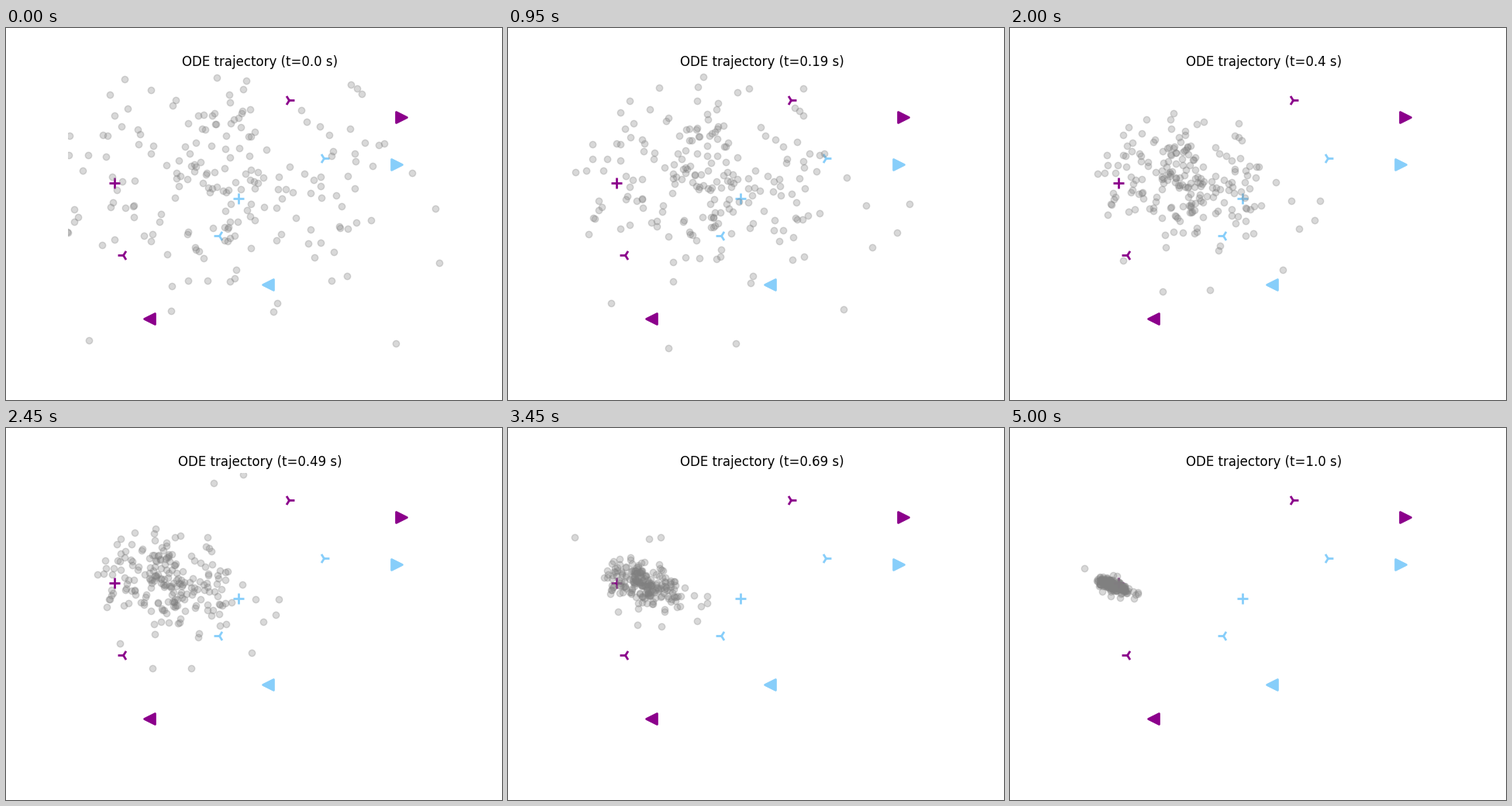
A matplotlib script that plays this animation: 640 by 480 pixels, repeating every 5.55 s.

```python
import numpy as np
import matplotlib.pyplot as plt
from matplotlib.animation import FuncAnimation

STEPS, HOLD, INTERVAL = 100, 11, 50
START = np.array([300, 220])

# Outermost particles, which shape the rim of the cloud (stage pixels).
RIM = [
    (50, 187), (81, 164), (88, 250), (70, 290), (107, 403), (205, 476),
    (319, 467), (503, 407), (559, 303), (604, 278), (630, 229), (554, 233),
    (464, 41), (445, 73), (-40, -65), (590, -140), (730, -175),
]

# Marker, its place at the end and at the start of the flow.
MARKERS = [
    ("<", (184.5, 375.3), (337.5, 331)),
    ("3", (150.7, 293.2), (275, 268.2)),
    ("+", (140, 200), (300, 220)),
    ("4", (364.5, 93.2), (409.7, 168.2)),
    (">", (509.7, 115), (503.7, 176)),
]


def make_cloud(seed=7, count=212):
    """Truncated normal cloud plus its rim, in units of 100 px around START."""
    z = np.random.default_rng(seed).normal(size=(count, 2))
    z = z[np.hypot(*z.T) < 2.25]
    core = (290, 203) + z * (120, 81)
    return (np.vstack([core, RIM]) - START) / 100


U, V = make_cloud().T


def flow(t):
    """Particle positions at time t: drift, contraction and a passing bend."""
    left = 1 - t
    width = 100 * left**1.45 + 9 * t**2
    height = 100 * left**(1.1 + 0.6 * t) + 5.8 * t**2
    bend = t * (30 - 26.5 * t)
    tilt = t * (8.5 - 6.4 * t)
    center_x = 300 - 165 * t + 5 * np.sin(2 * np.pi * t)
    center_y = 204.5 + 15.5 * left**1.8
    x = center_x + width * U + bend * (V + 0.2 * U * V - 0.18 * V**2)
    y = center_y + height * V + tilt * U
    return np.column_stack([x, y])


fig, ax = plt.subplots(figsize=(6.4, 4.8), dpi=100)
ax.set_xlim(80, 576)
ax.set_ylim(427.2, 57.6)
ax.axis("off")

for shape, end, start in MARKERS:
    for spot, color in ((end, "darkmagenta"), (start, "lightskyblue")):
        ax.scatter(*spot, s=100, marker=shape, color=color, linewidths=2)
cloud = ax.scatter(U, V, color="gray", alpha=0.3, zorder=3)
title = ax.set_title("")


def update(frame):
    t = min(frame, STEPS) / STEPS
    cloud.set_offsets(flow(t))
    title.set_text(f"ODE trajectory (t={t} s)")
    return cloud, title


anim = FuncAnimation(fig, update, frames=STEPS + HOLD, interval=INTERVAL,
                     repeat=True, repeat_delay=0)
plt.show()
```
